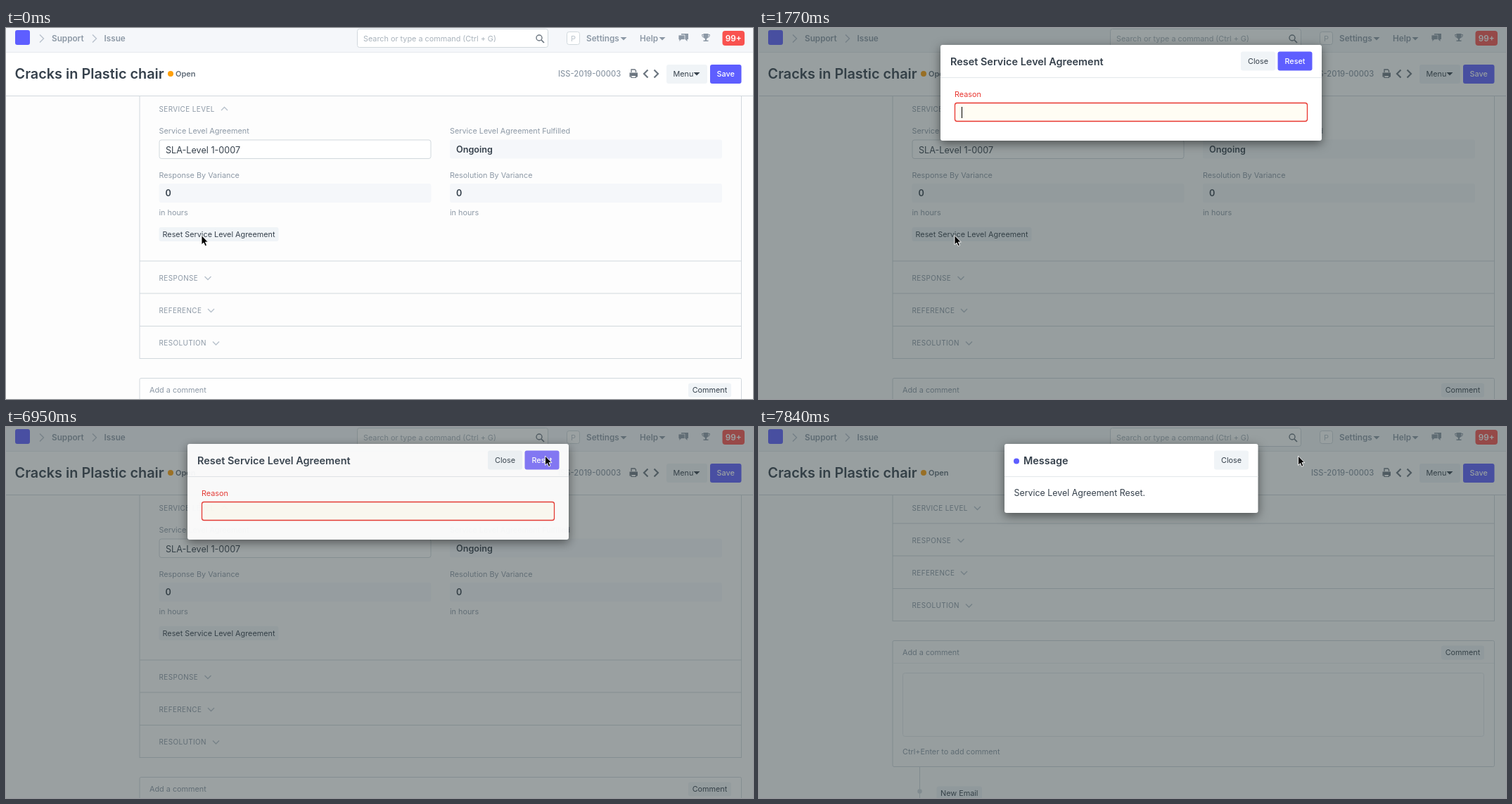
An HTML page for the animation above (8000 ms loop, 1062x527 px).

```html
<!DOCTYPE html>
<html lang="en">
<head>
<meta charset="utf-8">
<title>Reset service level agreement</title>
<style>
  html, body { margin: 0; width: 100%; height: 100%; overflow: hidden; background: #fdfdfd; }
  svg { display: block; width: 1062px; height: 527px; font-family: Inter, "Open Sans", sans-serif; }
  text { white-space: pre; }
  .modal { filter: drop-shadow(0 4px 7px rgba(0, 0, 0, .5)); }
</style>
</head>
<body>
<svg id="stage" viewBox="0 0 1062 527" xmlns="http://www.w3.org/2000/svg"></svg>
<script>
const LOOP = 8000;
const INK = '#36414c', GREY = '#8d99a6', LINE = '#d1d8dd', SOFT = '#f0f4f7', PALE = '#f5f7fa', BLUE = '#5e5eff', RED = '#e8352f';
const SMALL = 10.84, MEDIUM = 11.74, BASE = 12.64, LARGE = 14.45;

// Text is placed by the vertical middle of its capitals.
const text = (x, mid, str, { size = SMALL, fill = INK, weight = 400, extra = '' } = {}) =>
  `<text x="${x}" y="${(mid + size * .3635).toFixed(2)}" font-size="${size}" font-weight="${weight}" fill="${fill}" ${extra}>${str}</text>`;
const rect = (x, y, w, h, fill, { rx = 0, stroke = 'none', extra = '' } = {}) =>
  `<rect x="${x}" y="${y}" width="${w}" height="${h}" rx="${rx}" fill="${fill}" stroke="${stroke}" ${extra}/>`;
const path = (d, stroke = GREY, width = 1, fill = 'none', extra = '') =>
  `<path d="${d}" fill="${fill}" stroke="${stroke}" stroke-width="${width}" ${extra}/>`;
const rule = (y, x1 = 190, x2 = 1045, color = LINE) => path(`M${x1} ${y}H${x2}`, color);
const caretDown = (x, y, fill) => path(`M${x - 4.5} ${y - 2}h9l-4.5 4.5z`, 'none', 0, fill);
const button = (x, y, w, h, label, { fill = SOFT, color = INK, id = '', rx = 3, weight = 400 } = {}) =>
  rect(x, y, w, h, fill, { rx, extra: id && `id="${id}"` }) +
  text(x + w / 2, y + h / 2, label, { fill: color, weight, extra: 'text-anchor="middle"' });
const label = (x, mid, str) => text(x, mid, str, { fill: GREY });
const readOnly = (x, y, value) =>
  rect(x, y, 387, 27, PALE, { rx: 3 }) + text(x + 9, y + 13.5, value, { size: BASE, weight: 600 });
const chevron = (x, y, dir = 1, id = '') =>
  path(`M${x - 4.5} ${y - 2 * dir}l4.5 ${4.5 * dir}l4.5 ${-4.5 * dir}`, '#b8c2cc', 1.4, 'none', id && `id="${id}"`);
const heading = (mid, str, chevronX) =>
  text(217.5, mid, str, { size: 9.93, fill: GREY, extra: 'letter-spacing=".4"' }) + (chevronX ? chevron(chevronX, mid) : '');

const topBar = () =>
  rect(0, 0, 1062, 34, PALE) + rule(34.5, 0, 1062, '#e6eaee') +
  rect(13, 3, 21, 21, BLUE, { rx: 3 }) +
  [48, 123].map(x => path(`M${x} 9.5l5.5 5.5l-5.5 5.5`, '#b8c2cc', 1.4)).join('') +
  text(65, 15, 'Support', { size: MEDIUM, fill: GREY, weight: 600 }) +
  text(139.5, 15, 'Issue', { size: MEDIUM, fill: GREY, weight: 600 }) +
  rect(499.5, 1.5, 271, 26, '#fff', { rx: 3, stroke: LINE }) +
  text(508, 15, 'Search or type a command (Ctrl + G)', { fill: '#a9b3bc' }) +
  `<circle cx="758" cy="14" r="4" fill="none" stroke="#6c7680" stroke-width="1.4"/>` +
  path('M761 17l4 4', '#6c7680', 1.7) +
  rect(797.5, 5.5, 18, 18, '#fff', { rx: 3, stroke: LINE }) +
  text(806.5, 14.5, 'P', { size: 11, fill: '#bcc5cd', extra: 'text-anchor="middle"' }) +
  text(825, 14.5, 'Settings', { size: MEDIUM, fill: GREY, weight: 600 }) + caretDown(878, 15, GREY) +
  text(901, 14.5, 'Help', { size: MEDIUM, fill: GREY, weight: 600 }) + caretDown(933, 15, GREY) +
  path('M960 8h10v8h-1.5v3l-3-3h-5.5z', 'none', 0, GREY) +
  path('M956 10h9v6.5h-5l-3 3v-3h-1z', PALE, .8, GREY) +
  path('M991.5 8h7v4q-.5 3-2.5 3.5v2h2.5v1.5h-7v-1.5h2.5v-2q-2-.5-2.5-3.5z', 'none', 0, GREY) +
  path('M991.5 9.5h-2q0 4 3 4M998.500 9.5h2q0 4-3 4', GREY, 1) +
  rect(1018.5, 4, 31.500, 21, '#f9524f', { rx: 4 }) +
  text(1034.2, 14.5, '99+', { size: MEDIUM, fill: '#fff', weight: 600, extra: 'text-anchor="middle"' });

const pageHead = () =>
  rect(0, 35, 1062, 61, '#fff') + rule(96.5, 0, 1062) +
  text(12.5, 65, 'Cracks in Plastic chair', { size: 19.87, weight: 600 }) +
  `<circle cx="234" cy="65" r="4" fill="#ffa00a"/>` +
  text(241, 65, 'Open', { size: 11, fill: '#5f6b77', weight: 600 }) +
  text(785, 65, 'ISS-2019-00003', { size: 11.2, fill: GREY, weight: 500 }) +
  path('M889 63v-4h5l1.500 1.500v2.500', '#6c7680', 1.3) +
  path('M886.500 63.500h11.500v6h-2v-2.500h-7.500v2.500h-2z', 'none', 0, '#6c7680') +
  path('M889 67.500h6.500v3h-6.500z', '#6c7680', 1.2) +
  path('M912.500 59.500l-5.500 5.500l5.500 5.500M921.500 59.500l5.500 5.500l-5.500 5.500', '#6c7680', 2.2) +
  rect(939, 52, 58, 27, SOFT, { rx: 3 }) + text(948.5, 65, 'Menu') + caretDown(982, 65, INK) +
  button(1001, 52, 44.5, 27, 'Save', { fill: BLUE, color: '#fff', weight: 500 });

const fields = () =>
  label(217.5, 146.5, 'Service Level Agreement') +
  rect(218, 159, 386, 26.5, '#fff', { rx: 3, stroke: LINE }) +
  text(227, 173, 'SLA-Level 1-0007', { size: BASE }) +
  label(631, 146.5, 'Service Level Agreement Fulfilled') + readOnly(631, 158.5, 'Ongoing') +
  label(217.5, 209, 'Response By Variance') + readOnly(217.5, 221, '0') +
  label(631, 209, 'Resolution By Variance') + readOnly(631, 221, '0') +
  label(217.5, 262, 'in hours') + label(631, 262, 'in hours') +
  button(217.5, 283, 170, 20, 'Reset Service Level Agreement', { id: 'formButton' });

const lowerForm = () =>
  rule(331) + heading(355, 'RESPONSE', 287) +
  rule(377) + heading(401, 'REFERENCE', 291.5) +
  rule(423.5) + heading(447.5, 'RESOLUTION', 298.5) + rule(469.5) +
  rect(190, 497.5, 855.5, 179, '#fefefe', { rx: 2, stroke: LINE }) +
  label(204, 514.5, 'Add a comment') + button(970, 504.5, 61, 20, 'Comment') +
  rule(529.5, 190, 1045, '#ebeff2') +
  rect(204.5, 543.5, 826, 90, '#fefefe', { rx: 3, stroke: '#e6eaee' }) +
  label(204, 655, 'Ctrl+Enter to add comment') +
  path('M228.500 677v60', LINE) + `<circle cx="228.500" cy="711.500" r="3.2" fill="${LINE}"/>` +
  button(252.5, 704.5, 64.500, 20, 'New Email');

const modalBox = (x, w, h) => rect(x, 24, w, h, '#fff', { rx: 3, extra: 'class="modal"' }) + rule(70.5, x, x + w, '#e3e7ea');

const resetDialog = () =>
  modalBox(258, 542, 136) +
  text(272, 48, 'Reset Service Level Agreement', { size: LARGE, weight: 600 }) +
  button(685, 33.5, 49, 27, 'Close') +
  button(737.5, 33.5, 49, 27, 'Reset', { fill: BLUE, color: '#fff', weight: 500, id: 'confirm' }) +
  text(278, 94, 'Reason', { fill: RED }) +
  rect(278.5, 106.5, 501, 26, '#fff', { rx: 3, extra: 'id="input"' }) +
  text(288, 120, '', { size: BASE, weight: 600, fill: '#000', extra: 'id="typed"' }) +
  rect(288, 112, 1, 16, '#000', { extra: 'id="caret"' });

const messageDialog = () =>
  modalBox(349, 360.5, 98) +
  `<circle cx="366" cy="48.500" r="4" fill="${BLUE}"/>` +
  text(376, 48, 'Message', { size: LARGE, weight: 600 }) +
  button(647, 33.5, 49, 27, 'Close') +
  text(362.5, 93.5, 'Service Level Agreement Reset.', { size: 12.4 });

const stage = document.getElementById('stage');
stage.innerHTML =
  rect(0, 0, 1062, 527, '#fdfdfd') +
  path('M190 97V470M1045.500 97V470', LINE, 1, 'none', 'id="sides"') +
  heading(115, 'SERVICE LEVEL') + chevron(310.5, 115, -1, 'openMark') + chevron(310.5, 115, 1, 'closedMark') +
  `<g id="fields">${fields()}</g><g id="lower">${lowerForm()}</g>` +
  topBar() + pageHead() +
  rect(0, 0, 1062, 527, '#334143', { extra: 'id="backdrop"' }) +
  `<g id="dialog">${resetDialog()}</g><g id="message">${messageDialog()}</g>` +
  path('M0 0V13.300L3 10.500L5.100 15.200L7.500 14.200L5.400 9.600H9.300Z', '#fff', .9, '#000', 'id="pointer"');

const el = Object.fromEntries([...stage.querySelectorAll('[id]')].map(node => [node.id, node]));
const set = (node, attrs) => Object.entries(attrs).forEach(([key, value]) => node.setAttribute(key, value));

const REASON = 'Employee was on leave';
// Each step overrides some of the values left by the steps before it.
const steps = [
  [0, { pressed: false, shade: 0, dialog: 0, dialogY: 0, focus: false, chars: 0, caret: false,
        tip: [278, 294.5], confirm: BLUE, collapsed: false, message: 0, messageY: 0 }],
  [1190, { pressed: true }],
  [1340, { shade: .25 }],
  [1480, { shade: .46, dialog: .88, dialogY: -15, confirm: '#8a80fc' }],
  [1630, { shade: .5, dialog: 1, dialogY: -3, confirm: BLUE }],
  [1770, { dialogY: 0, pressed: false, focus: true, caret: true }],
  [2220, { caret: false }],
  [2360, { chars: 1, caret: true }],
  [2660, { chars: 2 }],
  [2950, { chars: 3 }], [3100, { chars: 4 }], [3250, { chars: 5 }],
  ...[6, 7, 8, 9, 11, 12, 14, 16].map((chars, i) => [3550 + Math.round(i * 14.86) * 10, { chars }]),
  [4740, { chars: 18 }], [4890, { chars: 19 }], [5030, { chars: 20 }], [5180, { chars: 21 }],
  [5320, { tip: [322, 270] }], [5470, { tip: [500, 168] }], [5610, { tip: [716, 70] }],
  [5760, { tip: [797.5, 36], caret: false }],
  [5910, { tip: [788, 37] }], [6060, { tip: [773, 40] }],
  [6210, { tip: [766.5, 41], caret: true }],
  [6360, { confirm: '#5348f2' }],
  [6810, { caret: false, confirm: '#4a40e8' }],
  [6950, { chars: 0, dialog: .94, confirm: '#8175f8', shade: .49 }],
  [7100, { dialog: 0, focus: false, shade: 0, confirm: BLUE }],
  [7550, { collapsed: true }],
  [7690, { shade: .46, message: .88, messageY: -12 }],
  [7840, { shade: .5, message: 1, messageY: 0 }]
];

function draw(time) {
  const s = Object.assign({}, ...steps.filter(([start]) => start <= time).map(([, change]) => change));
  const shift = s.collapsed ? -194 : 0;
  set(el.formButton, { fill: s.pressed ? '#cfdbe3' : SOFT });
  set(el.fields, { opacity: s.collapsed ? 0 : 1 });
  set(el.openMark, { opacity: s.collapsed ? 0 : 1 });
  set(el.closedMark, { opacity: s.collapsed ? 1 : 0 });
  set(el.lower, { transform: `translate(0 ${shift})` });
  set(el.sides, { d: `M190 97V${470 + shift}M1045.5 97V${470 + shift}` });
  set(el.backdrop, { opacity: s.shade });
  set(el.dialog, { opacity: s.dialog, transform: `translate(0 ${s.dialogY})` });
  set(el.confirm, { fill: s.confirm });
  set(el.input, { fill: s.focus ? '#fffdf4' : '#fff', stroke: s.focus ? RED : '#f2837f', 'stroke-width': s.focus ? 1.3 : 1 });
  el.typed.textContent = REASON.slice(0, s.chars);
  const width = s.chars ? el.typed.getComputedTextLength() : 0;
  set(el.caret, { x: Math.round(288 + width - .5), opacity: s.caret ? 1 : 0 });
  set(el.message, { opacity: s.message, transform: `translate(0 ${s.messageY})` });
  set(el.pointer, { transform: `translate(${s.tip})` });
}

function tick() {
  draw(performance.now() % LOOP);
  requestAnimationFrame(tick);
}
tick();
</script>
</body>
</html>
```
